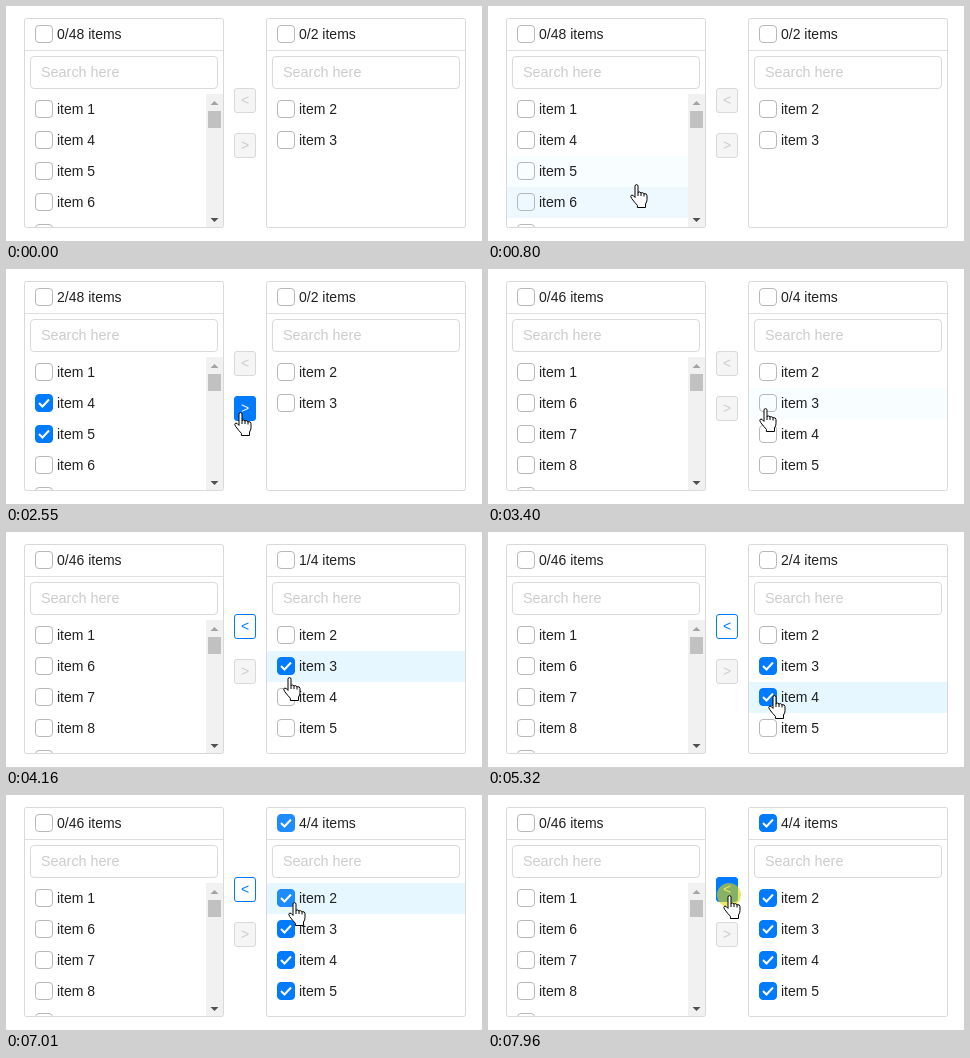
These frames come from a looping animation (476 px wide and 235 px high, 8 s). An HTML page with a canvas:

```html
<!DOCTYPE html>
<html lang="en">
<head>
<meta charset="utf-8">
<title>Transfer list</title>
<style>
html, body { margin: 0; width: 100%; height: 100%; overflow: hidden; background: #fff; }
canvas { display: block; width: 476px; height: 235px; }
</style>
</head>
<body>
<canvas id="stage"></canvas>
<script>
const W = 476, H = 235, LOOP = 8000;
const BLUE = '#007bff', LINE = '#d9d9d9', INK = '#212121', FAINT = '#cccccc';
const ROW = 31, LIST_TOP = 88, LIST_H = 133, PANEL_W = 200, BAR_W = 17;
const LEFT = 18, RIGHT = 260, BACK_Y = 82, SEND_Y = 127;
const PRESS = 60, CHECK_FADE = 150, ROW_FADE = 200;

const canvas = document.getElementById('stage');
const ctx = canvas.getContext('2d');
const dpr = window.devicePixelRatio || 1;
canvas.width = W * dpr;
canvas.height = H * dpr;

// Storyboard: pointer moves and clicks
const moves = [], clicks = [];
const checkedAt = { left: {}, right: {} };
let movedAt = Infinity;

function move(from, to, x, y, bow = 0) {
  moves.push({ from, to, x, y, bow });
}
function click(at) {
  clicks.push(at);
  return at + PRESS;
}
function check(at, side, n) {
  checkedAt[side][n] = click(at);
}

move(70, 70, 310, 232);
move(70, 860, 145, 178);
move(920, 1100, 98, 163);
check(1110, 'left', 5);
move(1190, 1340, 92, 142);
check(1780, 'left', 4);
move(1900, 2250, 204, 146);
move(2340, 2540, 234, 144);
move(2650, 2770, 239, 144);
movedAt = click(3020);
move(3240, 3460, 285, 139);
move(3880, 3940, 283, 146);
check(3940, 'right', 3);
move(4510, 4850, 283, 157);
check(4860, 'right', 4);
move(5200, 5320, 286, 164);
move(5320, 5800, 281, 188, 50);
check(5950, 'right', 5);
move(6070, 6700, 288, 108, -15);
check(6860, 'right', 2);
move(7120, 7320, 255, 106);
move(7430, 7630, 241, 101);
click(LOOP - 40);

function pointer(t) {
  const i = moves.findLastIndex(m => t >= m.from);
  if (i < 1) return null;
  const a = moves[i - 1], b = moves[i];
  const p = Math.min(1, (t - b.from) / (b.to - b.from));
  const e = p * p * (3 - 2 * p);
  return {
    x: a.x + (b.x - a.x) * e + b.bow * Math.sin(Math.PI * p),
    y: a.y + (b.y - a.y) * e
  };
}

function lists(t) {
  const moved = t >= movedAt;
  const count = side => Object.values(checkedAt[side]).filter(at => t >= at).length;
  const rightOn = count('right');
  return {
    left: {
      x: LEFT, items: moved ? [1, 6, 7, 8, 9] : [1, 4, 5, 6, 7], checks: checkedAt.left,
      on: moved ? 0 : count('left'), total: moved ? 46 : 48, bar: BAR_W
    },
    right: {
      x: RIGHT, items: moved ? [2, 3, 4, 5] : [2, 3], checks: checkedAt.right,
      on: rightOn, total: moved ? 4 : 2, bar: 0,
      allAt: rightOn === 4 ? Math.max(...Object.values(checkedAt.right)) : NaN
    }
  };
}

const rowWidth = list => PANEL_W - 2 - list.bar;

function hoveredRow(p, list) {
  if (!p || p.x <= list.x || p.x > list.x + rowWidth(list)) return -1;
  const i = Math.floor((p.y - LIST_TOP) / ROW);
  return p.y < LIST_TOP + LIST_H && i < list.items.length ? i : -1;
}

// Linear fade: the share of recent time spent over the row
function rowGlow(t, i, list) {
  const n = 20;
  let hits = 0;
  for (let k = 0; k < n; k++) hits += hoveredRow(pointer(t - k * ROW_FADE / n), list) === i;
  return hits / n;
}

function box(x, y, w, h, r, fill, stroke) {
  ctx.beginPath();
  ctx.roundRect(x + .5, y + .5, w - 1, h - 1, r - .5);
  if (fill) { ctx.fillStyle = fill; ctx.fill(); }
  ctx.strokeStyle = stroke;
  ctx.lineWidth = 1;
  ctx.stroke();
}

function label(s, x, y, color = INK, size = 14, align = 'left') {
  ctx.font = size + 'px "Liberation Sans", Arial, sans-serif';
  ctx.textAlign = align;
  ctx.fillStyle = color;
  ctx.fillText(s, x, y);
}

function checkbox(x, cy, age) {
  const y = cy - 9;
  if (!(age >= 0)) return box(x, y, 18, 18, 4, null, '#b5b9bd');
  const lift = .3 * Math.max(0, 1 - age / CHECK_FADE);
  const fill = `rgb(${255 * lift},${123 + 132 * lift},255)`;
  box(x, y, 18, 18, 4, fill, fill);
  ctx.beginPath();
  ctx.moveTo(x + 4, y + 9);
  ctx.lineTo(x + 7.5, y + 12.5);
  ctx.lineTo(x + 14, y + 5.5);
  ctx.strokeStyle = '#fff';
  ctx.lineWidth = 2;
  ctx.stroke();
}

function triangle(x, y, dir, color) {
  ctx.beginPath();
  ctx.moveTo(x - 4, y);
  ctx.lineTo(x + 4, y);
  ctx.lineTo(x, y + 4 * dir);
  ctx.fillStyle = color;
  ctx.fill();
}

function scrollbar(x) {
  ctx.fillStyle = '#f1f1f1';
  ctx.fillRect(x, LIST_TOP, BAR_W, LIST_H);
  ctx.fillStyle = '#c1c1c1';
  ctx.fillRect(x + 2, LIST_TOP + BAR_W, BAR_W - 4, 17);
  triangle(x + 8.5, 99, -1, '#a3a3a3');
  triangle(x + 8.5, 212, 1, '#505050');
}

function panel(t, list) {
  const { x, items, checks } = list;
  ctx.save();
  ctx.beginPath();
  ctx.rect(x + 1, LIST_TOP, PANEL_W - 2, LIST_H);
  ctx.clip();
  items.forEach((n, i) => {
    const top = LIST_TOP + i * ROW, cy = top + 15;
    ctx.fillStyle = `rgba(230,247,255,${rowGlow(t, i, list)})`;
    ctx.fillRect(x + 1, top, rowWidth(list), ROW);
    checkbox(x + 11, cy, t - checks[n]);
    label('item ' + n, x + 33, cy + 5);
  });
  if (list.bar) scrollbar(x + PANEL_W - 1 - list.bar);
  ctx.restore();

  box(x, 12, PANEL_W, 210, 2.5, null, LINE);
  ctx.fillStyle = '#dfdfdf';
  ctx.fillRect(x + 1, 44, PANEL_W - 2, 1);
  checkbox(x + 11, 28, t - list.allAt);
  label(`${list.on}/${list.total} items`, x + 33, 33);
  box(x + 6, 50, PANEL_W - 12, 33, 4, '#fff', LINE);
  label('Search here', x + 17, 71, FAINT, 14.4);
}

const inButton = (p, y) => p && p.x >= 228 && p.x < 250 && p.y >= y && p.y < y + 25;

function button(sign, y, on, p) {
  const hot = on && inButton(p, y);
  box(228, y, 22, 25, 3, hot ? BLUE : on ? '#fff' : '#f5f5f5', on ? BLUE : LINE);
  label(sign, 239, y + 17, hot ? '#fff' : on ? BLUE : FAINT, 14, 'center');
}

const arrow = new Path2D('M.5 .5V16.5L4.1 13.1 6.6 18.8 9 17.7 6.6 12.2H11.6Z');
const hand = new Path2D('M5 2.2Q5 .6 6.5 .6T8 2.2V8.3Q9.7 7.4 11 8.9 12.8 8.1 14 9.7 ' +
  '16.8 9.2 17 11.5V15.5Q17 18 15.5 20V23.5H7.4V21.3Q4.6 18.5 1.6 14.4 ' +
  '0 12 1.5 11.1 2.9 10.5 5 13.4Z');
const knuckles = new Path2D('M8 8V12M11 9V12M14 10V12.5');

function drawPointer(p, isHand) {
  const shape = isHand ? hand : arrow;
  ctx.save();
  ctx.translate(Math.round(p.x) - (isHand ? 6 : 0), Math.round(p.y) - (isHand ? 1 : 0));
  ctx.fillStyle = '#fff';
  ctx.strokeStyle = '#000';
  ctx.lineWidth = 1;
  ctx.lineJoin = 'round';
  ctx.fill(shape);
  ctx.stroke(shape);
  if (isHand) ctx.stroke(knuckles);
  ctx.restore();
}

function draw(t) {
  const { left, right } = lists(t), p = pointer(t);
  ctx.setTransform(dpr, 0, 0, dpr, 0, 0);
  ctx.fillStyle = '#fff';
  ctx.fillRect(0, 0, W, H);

  panel(t, left);
  panel(t, right);
  button('<', BACK_Y, right.on > 0, p);
  button('>', SEND_Y, left.on > 0, p);
  if (!p) return;

  if (clicks.some(at => t >= at && t < at + PRESS)) {
    ctx.beginPath();
    ctx.arc(p.x, p.y - 1, 12, 0, Math.PI * 2);
    ctx.fillStyle = 'rgba(225,215,0,.6)';
    ctx.fill();
  }
  const overRow = [left, right].some(list => hoveredRow(p, list) >= 0);
  const overButton = (right.on > 0 && inButton(p, BACK_Y)) || (left.on > 0 && inButton(p, SEND_Y));
  drawPointer(p, overRow || overButton);
}

const start = performance.now();
function tick() {
  draw((performance.now() - start) % LOOP);
  requestAnimationFrame(tick);
}
tick();
</script>
</body>
</html>
```
